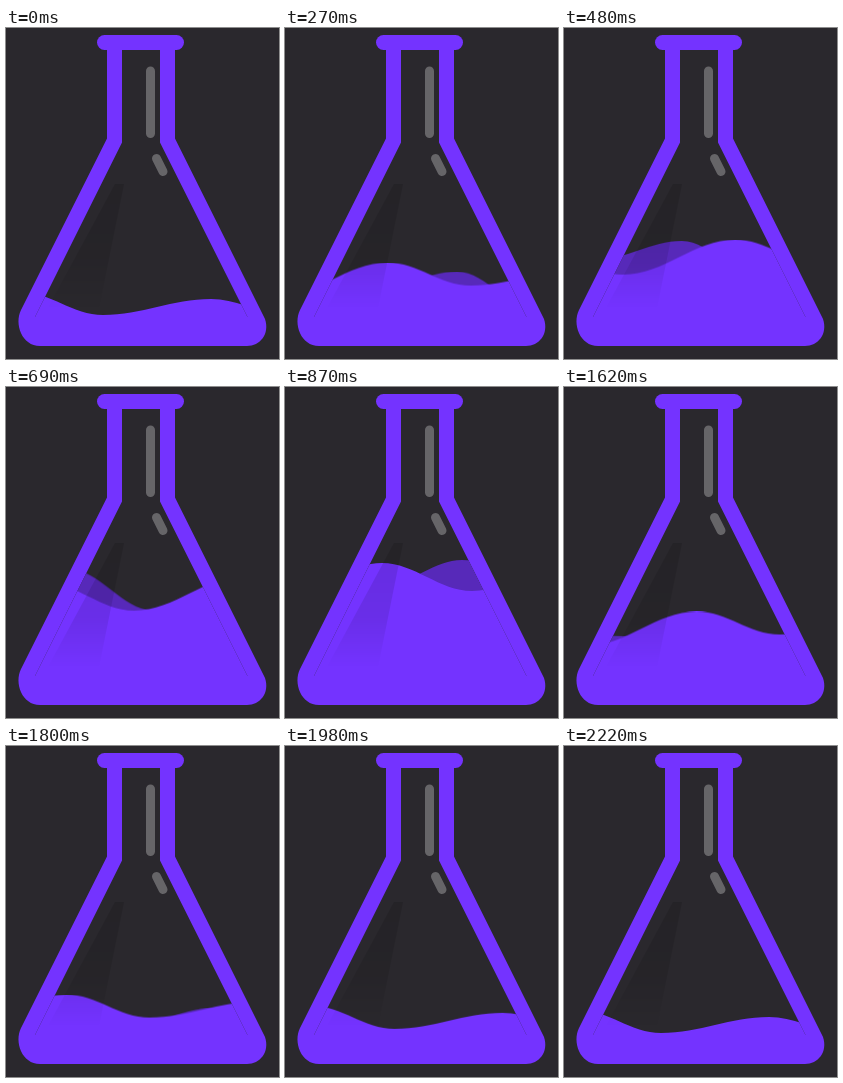
Recreate the animation shown at these times as an HTML page. Size 273 px wide and 331 px high, loop 2700 ms.

```html
<!DOCTYPE html>
<html lang="en">
<head>
<meta charset="utf-8">
<title>Flask</title>
<style>
  html, body { margin: 0; width: 100%; height: 100%; overflow: hidden; background: #2a282d; }
  svg { display: block; width: 100%; height: 100%; }
  .glass { fill: #7433ff; }
  .hollow { fill: #2a282d; }
  .shine { fill: none; stroke: #666568; stroke-width: 9; stroke-linecap: round; }
  .wave { animation: fill 2700ms -3ms infinite; }
  #back { fill: #5729b9; --dx: -225px; --dy: -127px; }
  #front { fill: #7433ff; --dx: 285px; --dy: -95px; }

  /* rise 0-870 ms, hold, fall 1320-2220 ms, hold; 30 ms per step */
  @keyframes fill {
    0% { transform: translate(0, 0); animation-timing-function: steps(29, end); }
    32.2222%, 48.8889% { transform: translate(var(--dx), var(--dy)); }
    32.2222% { animation-timing-function: linear; }
    48.8889% { animation-timing-function: steps(30, end); }
    82.2222%, 100% { transform: translate(0, 0); animation-timing-function: linear; }
  }
</style>
</head>
<body>
<svg viewBox="0 0 273 331" preserveAspectRatio="none">
  <defs>
    <clipPath id="cavity">
      <path d="M116 22V114.500L29 289H241.500L154 114.500V22Z"/>
    </clipPath>
    <linearGradient id="shade" gradientUnits="userSpaceOnUse" x1="0" y1="156" x2="0" y2="280">
      <stop offset="0" stop-opacity=".12"/>
      <stop offset=".6" stop-opacity=".09"/>
      <stop offset="1" stop-opacity="0"/>
    </linearGradient>
  </defs>

  <path class="glass" d="M101 15V110.500L15 282C8 296 16 318 34 318H241C254 318 264 306 259 291L169 110.500V15Z"/>
  <path class="hollow" d="M116 22V114.500L29 289H241.500L154 114.500V22Z"/>
  <g clip-path="url(#cavity)">
    <path id="back" class="wave"/>
    <path id="front" class="wave"/>
  </g>
  <path fill="url(#shade)" d="M109 156H118L93 280H42Z"/>
  <rect class="glass" x="91" y="7" width="87" height="15" rx="7.500"/>
  <path class="shine" d="M144.500 43V105.500M150.500 130.500L157 143.500"/>
</svg>
<script>
  // Smooth surface through alternating crests and troughs
  function surface(points) {
    let [x, y] = points[0];
    let d = `M${x} ${y}`;
    for (const [nx, ny] of points.slice(1)) {
      const h = (nx - x) * 0.3642;
      d += `C${x + h} ${y} ${nx - h} ${ny} ${nx} ${ny}`;
      [x, y] = [nx, ny];
    }
    return `${d}V500H${points[0][0]}Z`;
  }

  const waves = {
    front: [[-273, 297], [-188, 271], [-98, 299], [14, 264], [97, 287], [205, 271], [290, 290]],
    back: [[-20, 304], [70, 297], [155, 302], [242, 283], [325, 324], [402, 300], [485, 324]]
  };
  for (const id in waves) document.getElementById(id).setAttribute('d', surface(waves[id]));
</script>
</body>
</html>
```
